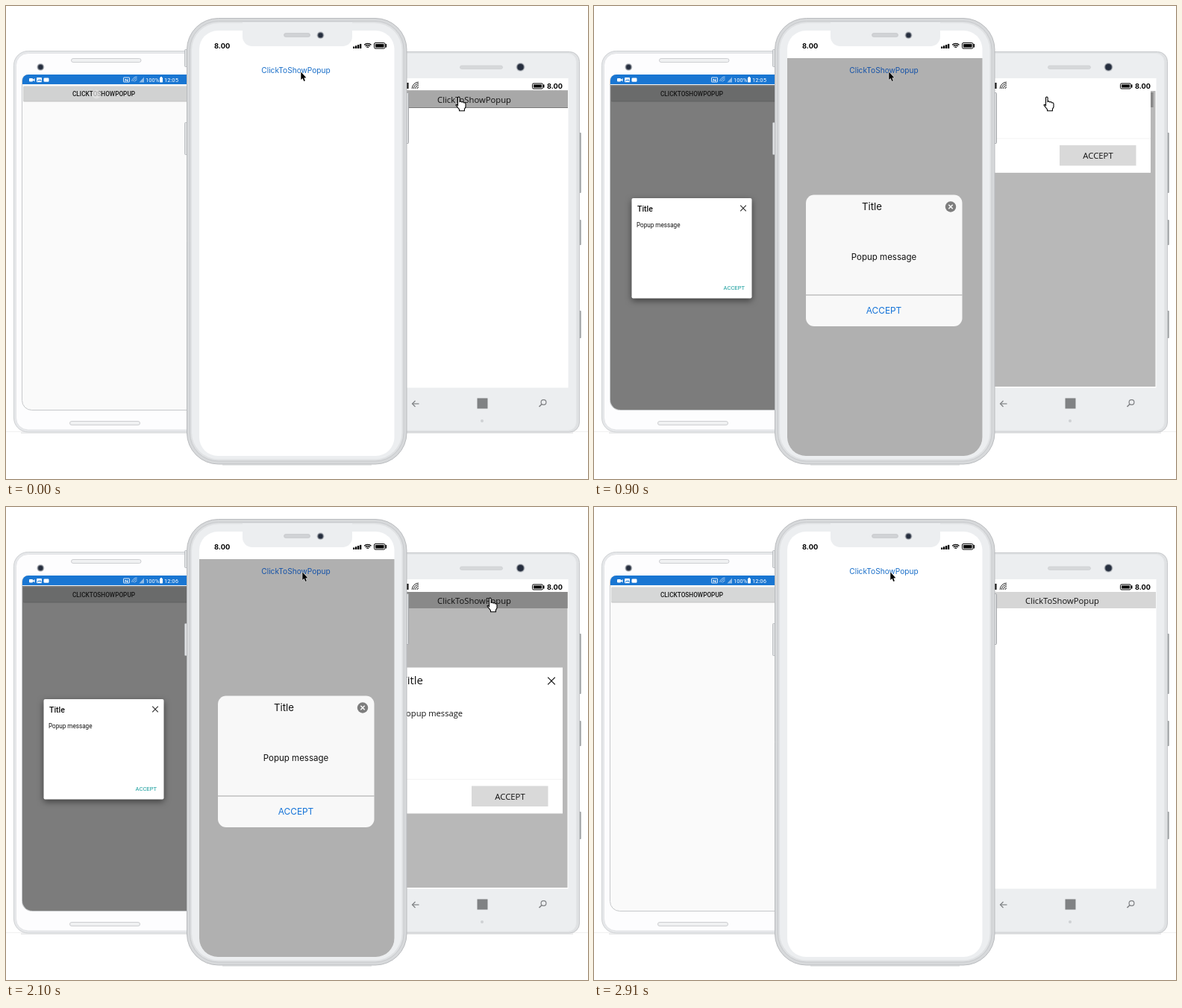
An HTML page with a canvas that plays this animation: 780x635 px, repeating every 2940 ms.

```html
<!DOCTYPE html>
<html lang="en">
<head>
<meta charset="utf-8">
<title>Popup on three phones</title>
<style>
html, body { margin: 0; width: 100%; height: 100%; overflow: hidden; background: #fff; }
canvas { display: block; }
</style>
</head>
<body>
<canvas id="stage" width="780" height="635"></canvas>
<script>
const ctx = document.getElementById('stage').getContext('2d');
const LOOP = 2940, STEP = 30;
const ROBOTO = 'Roboto, sans-serif', INTER = 'Inter, sans-serif', OPEN = '"Open Sans", sans-serif';

const clamp = v => Math.max(0, Math.min(1, v));
const span = (t, a, b) => clamp((t - a) / (b - a));
const mix = (a, b, p) => a + (b - a) * p;
const smooth = p => p * p * (3 - 2 * p);

function rect(x, y, w, h, fill) {
  ctx.fillStyle = fill;
  ctx.fillRect(x, y, w, h);
}
function box(x, y, w, h, r, fill, stroke, lw = 1) {
  ctx.beginPath();
  ctx.roundRect(x, y, w, h, r);
  if (fill) { ctx.fillStyle = fill; ctx.fill(); }
  if (stroke) { ctx.strokeStyle = stroke; ctx.lineWidth = lw; ctx.stroke(); }
}
function disc(x, y, r, fill) {
  ctx.beginPath();
  ctx.arc(x, y, r, 0, Math.PI * 2);
  ctx.fillStyle = fill;
  ctx.fill();
}
function line(points, color, lw = 1) {
  ctx.beginPath();
  points.forEach(([x, y]) => ctx.lineTo(x, y));
  ctx.strokeStyle = color;
  ctx.lineWidth = lw;
  ctx.stroke();
}
function arc(x, y, r, a, b, color, lw) {
  ctx.beginPath();
  ctx.arc(x, y, r, a, b);
  ctx.strokeStyle = color;
  ctx.lineWidth = lw;
  ctx.stroke();
}
function cross(x, y, r, color, lw) {
  line([[x - r, y - r], [x + r, y + r]], color, lw);
  line([[x + r, y - r], [x - r, y + r]], color, lw);
}
function text(s, x, y, size, family, color, align = 'left', weight = 400) {
  ctx.font = `${weight} ${size}px ${family}`;
  ctx.textAlign = align;
  ctx.fillStyle = color;
  ctx.fillText(s, x, y);
}
function clipped(x, y, w, h, r, draw) {
  ctx.save();
  ctx.beginPath();
  ctx.roundRect(x, y, w, h, r);
  ctx.clip();
  draw();
  ctx.restore();
}
function camera(x, y, r) {
  disc(x, y, r, '#c6c9ce');
  disc(x, y, r - 1, '#6a707a');
  disc(x, y, r - 2, '#262e3e');
}
function battery(x, y, w, h) {
  box(x + .5, y + .5, w - 3, h - 1, 1.5, null, '#000');
  rect(x + 2, y + 2, w - 6, h - 4, '#000');
  rect(x + w - 2, y + 2, 1.5, h - 4, '#000');
}

// A popup slides in from above, stays, and leaves the same way.
function slide(t, [inA, inB, outA, outB], hidden, rest) {
  if (t <= inA || t >= outB) return null;
  return t < outA ? mix(hidden, rest, span(t, inA, inB))
                  : mix(rest, hidden, span(t, outA, outB));
}

function androidIcons(t) {
  const w = '#fff';
  box(31, 97, 5, 4.5, 1, w);
  ctx.beginPath();
  ctx.moveTo(35.5, 99.2); ctx.lineTo(38.5, 97); ctx.lineTo(38.5, 101.5);
  ctx.fill();
  box(41, 96, 7, 6.3, 1, w);
  line([[42, 101], [44, 99], [45, 100], [46, 98.8], [47.3, 101]], '#1976d2');
  box(50.5, 96.5, 7, 5.3, 1.3, w);
  box(157.5, 96, 8, 6, .5, null, '#dbe9f8');
  line([[160, 101], [160, 98], [163, 101], [163, 98]], w);
  for (const r of [3, 5, 7]) arc(175.5, 102, r, Math.PI * 1.05, Math.PI * 1.5, '#c5dbf3', .8);
  ctx.beginPath();
  ctx.moveTo(178.5, 102.5); ctx.lineTo(185, 102.5); ctx.lineTo(185, 95.5);
  ctx.fillStyle = '#8fbbe8';
  ctx.fill();
  text('100%', 187, 102, 7.5, ROBOTO, w);
  box(206, 96, 4, 6.5, .7, w);
  rect(207, 95, 2, 1, w);
  text(t < 1410 ? '12:05' : '12:06', 212, 102, 7.6, ROBOTO, w);
}

function touch(x, y, alpha) {
  if (alpha <= 0) return;
  ctx.globalAlpha = alpha;
  disc(x, y, 6, '#e6e6e6');
  ctx.globalAlpha = 1;
}

function androidPhone(t) {
  const corners = [8, 2, 2, 13];
  box(10.5, 60.5, 300, 511.5, 19, '#e6e8ea', '#cfd1d4');
  box(13.5, 63.5, 294, 505.5, 16, '#fdfdfe', '#e3e4e7');
  camera(46.3, 82, 5);
  box(87.5, 70.5, 93.5, 5, 2.5, '#f0f1f2', '#cdced1');
  box(85.5, 557.5, 94, 5, 2.5, '#f0f1f2', '#cdced1');
  box(21.5, 92.5, 260, 450, corners, '#fafafa', '#c6c8ca');

  clipped(22, 92, 260, 450, corners, () => {
    rect(22, 92, 260, 13, '#1976d2');
    androidIcons(t);
    rect(22, 105, 260, 1, '#f1f4f7');
    box(23, 108, 258, 20.5, 1.5, '#c3c4c4');
    box(23, 107.5, 258, 20, 1.5, t < 120 ? '#d1d2d2' : '#d6d7d7');
    const y = slide(t, [140, 410, 2423, 2693], -44, 258);
    if (y !== null) rect(22, 106, 260, 440, 'rgba(0,0,0,.5)');
    text('CLICKTOSHOWPOPUP', 131, 121, 8.25, ROBOTO, '#161616', 'center', 500);
    if (t < 540) touch(121, 118.5, t < 120 ? .7 : .5 * (1 - span(t, 400, 520)));
    else touch(131, 118, .85 * span(t, 2340, 2400) * (1 - span(t, 2520, 2640)));
    if (y !== null) androidPopup(y);
  });
}

function androidPopup(y) {
  clipped(22, 106, 260, 440, 0, () => {
    ctx.save();
    ctx.shadowColor = 'rgba(0,0,0,.5)';
    ctx.shadowBlur = 9;
    ctx.shadowOffsetY = 3;
    box(50.5, y, 161, 134.5, 2, '#fff');
    ctx.restore();
    text('Title', 58, y + 17.5, 10.5, ROBOTO, '#111', 'left', 500);
    cross(200, y + 13.5, 3.8, '#333', 1.2);
    text('Popup message', 57, y + 39.2, 8.15, ROBOTO, '#111');
    text('ACCEPT', 202, y + 122.6, 7.6, ROBOTO, '#129b9b', 'right');
  });
}

function windowsPhone(t) {
  for (const [y, h] of [[170, 81], [287, 34], [409, 37]]) box(767, y, 3.8, h, 1, '#a2a5a8');
  box(480.5, 61.5, 288, 510.5, 13, '#dfe1e3', '#c6c8cb');
  box(482.5, 63.5, 282, 506.5, 11, '#eceef0', '#e3e5e7');
  box(608.5, 80, 57, 4.5, 2.2, '#d6d8da', '#cdcfd2', .7);
  camera(689.5, 82, 6);

  rect(480, 97, 273.5, 415.5, '#fff');
  rect(537, 103, 2.5, 8, '#111');
  for (const r of [2, 4.3, 6.6, 8.8]) arc(553, 111, r, Math.PI, Math.PI * 1.5, '#222', 1);
  battery(705, 103.5, 17, 8);
  text('8.00', 746, 111, 9.2, INTER, '#000', 'right', 700);

  const y = slide(t, [800, 1070, 2235, 2475], -82, 216);
  const tilted = t >= 750 && t < 1260;
  const light = t >= 2430;
  const pad = tilted ? 2 : 0;
  const fill = light ? '#d6d6d6' : t >= 750 ? '#bdbdbd' : '#a8a8a8';
  box(490, 114 + pad, 263 - pad * 1.7, 22 - pad, 0, fill);
  if (t < 750) {
    rect(490, 113, 263, 1, '#b4b4b4');
    rect(490, 136, 263, 1, '#787878');
  }
  if (y !== null) rect(480, 114, 272.5, 397, 'rgba(0,0,0,.28)');
  text('ClickToShowPopup', 627.5 + (tilted ? .6 : 0), 130, 11.25, OPEN, '#111', 'center');
  if (y !== null) windowsPopup(y);

  windowsKeys();
  if (t < 2640) hand(mix(603, 645, smooth(span(t, 1300, 2010))), 121.5);
}

function windowsPopup(y) {
  clipped(480, 114, 273, 397, 0, () => {
    rect(500, y - .5, 246, 196, '#fff');
    text('Title', 559, y + 22.3, 15, OPEN, '#111', 'right');
    cross(731, y + 17.5, 4.8, '#111', 1.2);
    text('Popup message', 612, y + 65.3, 11.15, OPEN, '#111', 'right');
    rect(500, y + 149, 246, 1, '#f3f3f3');
    rect(624, y + 158.5, 102.5, 27.5, '#d9d9d9');
    text('ACCEPT', 675.5, y + 176.8, 11.3, OPEN, '#111', 'center');
  });
}

function windowsKeys() {
  const c = '#7f8184';
  line([[553.5, 534], [544.5, 534]], c, 1.2);
  line([[548.5, 530], [544.5, 534], [548.5, 538]], c, 1.2);
  rect(631.5, 526.5, 14, 14, '#808284');
  arc(720.5, 532, 3.4, 0, Math.PI * 2, c, 1.2);
  line([[718, 534.5], [714.5, 538]], c, 1.6);
  disc(638, 557, 2, '#cfd1d4');
}

function hand(x, y) {
  ctx.save();
  ctx.translate(x, y);
  ctx.beginPath();
  ctx.moveTo(2.5, 12);
  ctx.lineTo(2.5, 1.6);
  ctx.quadraticCurveTo(3.8, -.6, 5.1, 1.6);
  ctx.lineTo(5.1, 7);
  ctx.quadraticCurveTo(7, 5.6, 8, 7.6);
  ctx.quadraticCurveTo(9.8, 6.4, 10.7, 8.4);
  ctx.quadraticCurveTo(12.6, 7.6, 13, 9.8);
  ctx.lineTo(13, 14);
  ctx.lineTo(11.4, 17);
  ctx.lineTo(11.4, 19.3);
  ctx.lineTo(4.6, 19.3);
  ctx.lineTo(4.4, 17.2);
  ctx.lineTo(.2, 12);
  ctx.quadraticCurveTo(-.3, 9.4, 2.5, 12);
  ctx.closePath();
  ctx.fillStyle = '#fff';
  ctx.fill();
  ctx.strokeStyle = '#000';
  ctx.lineWidth = 1.1;
  ctx.stroke();
  ctx.restore();
}

function arrow(x, y) {
  ctx.save();
  ctx.translate(x, y);
  ctx.beginPath();
  for (const [px, py] of [[0, 0], [0, 10.4], [2.3, 8.4], [4, 12.4], [5.6, 11.7], [4, 7.8], [7, 7.6]])
    ctx.lineTo(px, py);
  ctx.closePath();
  ctx.strokeStyle = '#fff';
  ctx.lineWidth = 1;
  ctx.stroke();
  ctx.fillStyle = '#000';
  ctx.fill();
  ctx.restore();
}

function iosStatus() {
  text('8.00', 279, 57, 9.3, INTER, '#000', 'left', 700);
  for (let i = 0; i < 4; i++) rect(465 + i * 3, 54.5 - i * 1.2, 2.3, 2.5 + i * 1.2, '#000');
  for (const r of [2, 4.3, 6.6]) arc(484.8, 57, r, Math.PI * 1.25, Math.PI * 1.75, '#000', 1.3);
  battery(493, 49, 17.5, 8.5);
}

function iosPhone(t) {
  for (const [y, h] of [[58, 23], [156, 43]]) box(239.5, y + .5, 5, h, 1, '#dfe1e3', '#b2b5b9', .8);
  box(534.5, 116.5, 5, 68, 1, '#dfe1e3', '#9a9da1', .9);
  rect(290, 615.5, 200, 1.2, '#dcdddf');
  box(242.5, 16.5, 294.5, 598.5, 42, '#d7d9db', '#b9bbbe');
  box(246.5, 20.5, 286.5, 590.5, 38, '#dfe1e3', '#c8cacd');
  box(249, 23, 281.5, 585.5, 36, '#eceef0');

  clipped(259, 33, 261.5, 571, 25, () => {
    rect(259, 33, 262, 572, '#fff');
    const y = slide(t, [361, 631, 2355, 2625], -108, 253);
    if (y !== null) rect(259, 70, 262, 535, '#b0b0b0');
    const pressed = t >= 330 && t < 750;
    ctx.globalAlpha = pressed ? mix(.2, 1, span(t, 430, 700)) : 1;
    text('ClickToShowPopup', 388.5, 89.6, 10.15, INTER, y === null ? '#1a6fc9' : '#1553a8', 'center');
    ctx.globalAlpha = 1;
    if (y !== null) iosPopup(y);
    iosStatus();
  });

  box(317, 22, 147, 32, [0, 0, 13, 13], '#eceef0');
  box(372.5, 36.5, 35, 5, 2.5, '#d0d2d5', '#c6c8cb', .7);
  camera(421.5, 39.2, 5);
  const p = smooth(span(t, 1650, 2010));
  arrow(mix(395.3, 397.3, p), mix(88.6, 87.6, p));
}

function iosPopup(y) {
  clipped(259, 70, 262, 535, 0, () => {
    box(284, y + .5, 209.5, 176.5, 11, '#f8f8f8');
    text('Title', 372.5, y + 21.3, 13.2, INTER, '#111', 'center');
    disc(478, y + 16.5, 7.2, '#7e7e7e');
    cross(478, y + 16.5, 2.7, '#fff', 1.4);
    text('Popup message', 388.5, y + 87.8, 11.5, INTER, '#111', 'center');
    rect(284, y + 134.5, 209.5, 1, '#a4a4a4');
    text('ACCEPT', 388.5, y + 159.8, 11.9, INTER, '#1473d8', 'center');
  });
}

function draw(t) {
  rect(0, 0, 780, 635, '#fff');
  rect(0, 571, 780, 1, '#f0f0f0');
  rect(20, 572.5, 740, 1.2, '#dfe0e2');
  androidPhone(t);
  windowsPhone(t);
  iosPhone(t);
}

const start = performance.now();
function tick() {
  const t = (performance.now() - start) % LOOP;
  draw(Math.floor(t / STEP) * STEP);
  requestAnimationFrame(tick);
}
tick();
</script>
</body>
</html>
```
